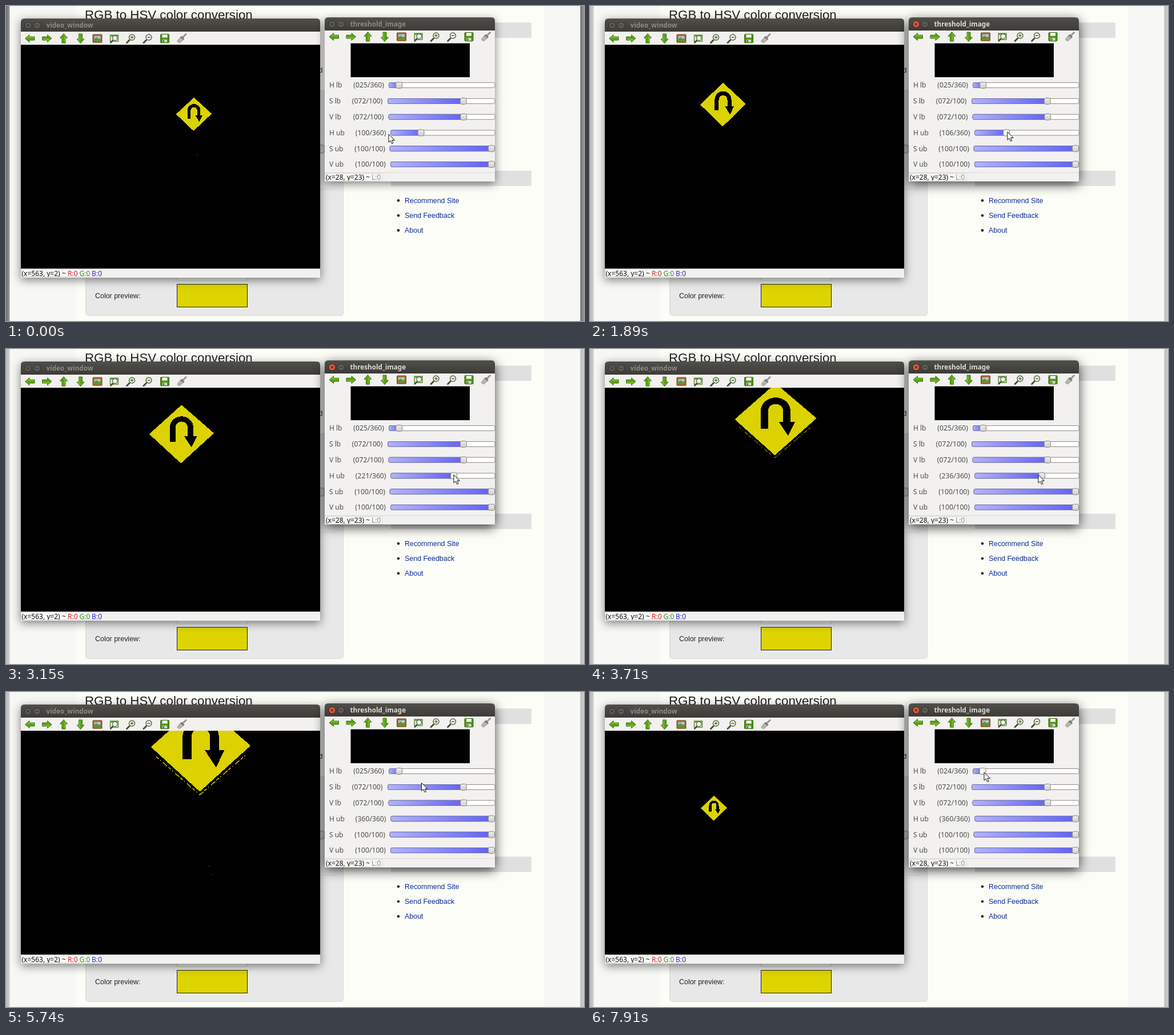
Recreate the animation shown at these times as an HTML page. Size 1012 px wide and 553 px high, loop 8000 ms.

```html
<!DOCTYPE html>
<html lang="en">
<head>
<meta charset="utf-8">
<title>HSV threshold tuning</title>
<style>
html, body { margin: 0; width: 100%; height: 100%; overflow: hidden; background: #fdfdf8; }
svg { display: block; width: 1012px; height: 553px; }
.page { font-family: "Liberation Sans", Arial, sans-serif; font-size: 12.45px; fill: #222; }
.ui { font-family: "Noto Sans", "Open Sans", sans-serif; font-size: 12px; fill: #4c4c4c; }
.title { font-weight: 700; font-size: 11.7px; fill: #8b8a83; }
.link { fill: #0b2d92; }
.shadow { filter: drop-shadow(0 4px 8px rgba(0, 0, 0, .5)); }
.focused .shadow { filter: drop-shadow(0 5px 10px rgba(0, 0, 0, .75)); }
.focused .title { fill: #dfdbd2; }
.close { fill: #5d5c57; }
.focused .close { fill: #ea5a35; }
</style>
</head>
<body>
<svg id="stage" viewBox="0 0 1012 553">
  <defs>
    <linearGradient id="bar" x2="0" y2="1"><stop stop-color="#504f4a"/><stop offset="1" stop-color="#3c3b37"/></linearGradient>
    <linearGradient id="fill"><stop stop-color="#b2b2fa"/><stop offset="1" stop-color="#6262f6"/></linearGradient>
    <linearGradient id="knob" x2="0" y2="1"><stop stop-color="#ededeb"/><stop offset="1" stop-color="#cfcecb"/></linearGradient>
    <linearGradient id="edge"><stop stop-color="#6c6c6c"/><stop offset="1" stop-color="#9b9b9b"/></linearGradient>
    <linearGradient id="paleEdge"><stop stop-color="#bababa"/><stop offset="1" stop-color="#cfcfcf"/></linearGradient>
    <clipPath id="view"><path d="M26 68h524v393H26z"/></clipPath>
    <clipPath id="panel"><path d="M558 20h298.500v288H558z"/></clipPath>
    <clipPath id="statusA"><path d="M26 461h524v14.500H26z"/></clipPath>
    <clipPath id="statusB"><path d="M558 293h298v13.500H558z"/></clipPath>

    <g id="arrow"><path d="M-8.500 0L-1-6.500V-3H8V3H-1V6.500z" fill="#5ba414" stroke="#3c770b" stroke-linejoin="round"/><path d="M-6-.5L-2-4v2.200h9" fill="none" stroke="#93cf4b"/></g>
    <g id="picture"><rect x="-8" y="-7" width="16" height="14" rx="1" fill="#b5651d" stroke="#77400f"/><path d="M-5.500-4.500h11v9h-11z" fill="#8fc3e8"/><path d="M-5.500 4.500V1l4-3 3 3 2-1.500 2 2v3z" fill="#4f9a2a"/><circle cx="3" cy="-2.500" r="1.300" fill="#f7e06a"/></g>
    <g id="lens"><path d="M-3 3l-4.500 4.500" stroke="#49433b" stroke-width="2.800" stroke-linecap="round"/><circle cx="1.500" cy="-2" r="5" fill="#eef5e8" stroke="#5d6355" stroke-width="1.500"/></g>
    <g id="fit"><path d="M-7-6h14V5H-7z" fill="#dcebd0" stroke="#63963a" stroke-width="1.500"/><path d="M-6-4.500H6" stroke="#4e8d20" stroke-width="2"/><g transform="translate(0 1) scale(.85)"><use href="#lens"/></g></g>
    <g id="zoomIn"><use href="#lens"/><path d="M-1-2h5M1.500-4.500v5" stroke="#4d9610" stroke-width="1.800"/></g>
    <g id="zoomOut"><use href="#lens"/><path d="M-1-2h5" stroke="#4d9610" stroke-width="1.800"/></g>
    <g id="save"><rect x="-7.500" y="-7.500" width="15" height="15" rx="1.500" fill="#4c9512" stroke="#34690a"/><path d="M-4.500-7h9v5.500h-9z" fill="#f0f5ea"/><path d="M-4 2h8v5h-8z" fill="#cfd8c6"/><path d="M-2 3v3.500" stroke="#34690a" stroke-width="2"/></g>
    <g id="brush"><path d="M2.500-2.500L7.500-7.500" stroke="#97968f" stroke-width="3" stroke-linecap="round"/><path d="M0-4.500l5 5-2 2-5.500-5z" fill="#77766f"/><path d="M-2.500-2.500L3 2.500-4 8l-4-3z" fill="#b4b3ac" stroke="#8f8e88" stroke-width=".7"/></g>
  </defs>

  <g class="page">
    <path d="M0 0h1012v553H0z" fill="#f7f7f5"/>
    <path d="M123 0h819v553H123z" fill="#fdfdf8"/>
    <g id="edges" fill="url(#edge)"><path d="M0 0h6.500v553H0z"/><path d="M1005.500 0h6.500v553h-6.500z"/></g>
    <text x="138" y="23" font-size="22.3">RGB to HSV color conversion</text>
    <text x="547.500" y="117">d</text>
    <rect x="139.500" y="148.500" width="451" height="395" rx="5" fill="#e8e8e8" stroke="#d8d8d8"/>
    <path d="M550 321.500h25" stroke="#c8c8c8" stroke-dasharray="1 1"/>
    <rect x="545" y="244" width="13" height="14" rx="4" fill="#d4d4d4" stroke="#8c8c8c"/>
    <path d="M299.500 470v12h123v-12" fill="#eef0ea" stroke="#c6d3c8"/>
    <text x="156" y="513">Color preview:</text>
    <rect x="299.500" y="488.500" width="123" height="40" fill="#ddd400" stroke="#222"/>
    <path d="M674 29h246v27H674zM674 289h246v27H674z" fill="#e0e0e0"/>
    <g id="links"></g>
  </g>
  <g id="videoWindow" class="ui"></g>
  <g clip-path="url(#view)" shape-rendering="crispEdges">
    <g id="sign">
      <path d="M-.98 0L0-.98 .98-.03 -.02 .98z" fill="#dcd200" stroke="#dcd200" stroke-width=".04" stroke-linejoin="round"/>
      <path d="M-.28 .27V-.2C-.28-.63 .28-.63 .28-.2V.1" fill="none" stroke="#000" stroke-width=".18"/>
      <path d="M.08 .07H.48L.31 .46z"/>
      <path id="rim" d="M-.9 .22L-.02 1.08 .9 .19" fill="none" stroke="#c9c000" stroke-width=".018" stroke-dasharray=".07 .04 .02 .06 .12 .03"/>
    </g>
    <rect id="speckA" width="1" height="1" fill="#8a8840"/>
    <rect id="speckB" width="1" height="1" fill="#8a8840"/>
  </g>
  <g id="panelWindow" class="ui"></g>
  <path id="cursor" d="M0 0V14.300l3.300-3 2.300 5.200 2.400-1-2.300-5h4.600z" fill="#fff" stroke="#111" stroke-linejoin="round"/>
</svg>
<script>
const $ = id => document.getElementById(id);
const LOOP = 8000, STEP = 70, LAST = 7910;
const FOCUS_AT = 1820, RESTART_AT = 7490;
const PAUSES = [[3290, 3430], [3710, 3850], [4900, 5110], [7140, 7280]];

// time, centre x, centre y, half width, half height
const SIGN = [
  [0, 329, 190, 31, 29], [840, 168, 190, 33.5, 31], [1120, 163, 186.5, 34.5, 33.5],
  [1680, 215, 175, 38, 37], [2590, 293, 167, 45, 42], [3290, 311, 145, 59, 53],
  [3710, 325, 123.5, 71, 62.5], [4690, 341, 95.5, 87, 78], [6720, 341, 97.5, 86, 77.5],
  [RESTART_AT - STEP, 340, 97, 86, 77.5], [RESTART_AT, 222, 206, 22, 21.5], [LAST, 217, 204, 23, 22]
];
// time, tip x, tip y
const CURSOR = [
  [0, 670, 225], [350, 711, 226], [560, 711, 215], [910, 691, 142], [1120, 689, 137],
  [1330, 692, 150], [1680, 727, 221], [1820, 728, 221], [2590, 760, 220], [3290, 790, 221],
  [3710, 785, 221], [4690, 853, 223], [4900, 860, 225], [5250, 859, 224], [5880, 690, 141],
  [6020, 689, 140], [6720, 666, 139], [7140, 668, 140], [7910, 690, 141]
];
const UPPER_HUE = [[0, 100], [1820, 100], [2590, 162], [3290, 236], [3850, 236], [4690, 353], [4900, 360], [LAST, 360]];
const LOWER_HUE = [[0, 25], [6020, 25], [6650, 0], [7140, 0], [LAST, 24]];

// label, value, maximum, track start, row y, right end of the number
const SLIDERS = [
  ["H lb", 25, 360, 670, 139, 662], ["S lb", 72, 100, 668, 167, 659.5], ["V lb", 72, 100, 669.5, 194.700, 661.5],
  ["H ub", 100, 360, 673, 222.500, 665.5], ["S ub", 100, 100, 671.5, 250.300, 664], ["V ub", 100, 100, 673, 278, 665]
];

function at(keys, t) {
  let i = 1;
  while (i < keys.length - 1 && keys[i][0] < t) i++;
  const a = keys[i - 1], b = keys[i];
  const p = Math.min(1, (t - a[0]) / (b[0] - a[0]));
  return a.slice(1).map((v, k) => v + (b[k + 1] - v) * p);
}

function set(el, attrs) {
  for (const k in attrs) el.setAttribute(k, attrs[k]);
}

function windowFrame(x, y, w, h, title) {
  const button = (cx, cls, mark) =>
    `<circle cx="${cx}" cy="${y + 12}" r="5.800" class="${cls}" fill="#5d5c57" stroke="#33322e"/>
     <path d="${mark}" transform="translate(${cx} ${y + 12})" stroke="#33322e" stroke-width="1.300"/>`;
  return `<path class="shadow" d="M${x} ${y + h}V${y + 6}q0-6 6-6h${w - 12}q6 0 6 6v${h - 6}z" fill="#f2f1f0"/>
    <path d="M${x} ${y + 23}v-17q0-6 6-6h${w - 12}q6 0 6 6v17z" fill="url(#bar)"/>
    ${button(x + 13, "close", "M-2-2l4 4m0-4l-4 4")}${button(x + 28.5, "", "M-2.500 0h5")}
    <text class="title" x="${x + 44.5}" y="${y + 16}">${title}</text>`;
}

function toolbar(x, y) {
  const turns = [0, 180, 90, -90];
  const names = ["arrow", "arrow", "arrow", "arrow", "picture", "fit", "zoomIn", "zoomOut", "save", "brush"];
  return names.map((name, i) =>
    `<use href="#${name}" transform="translate(${x + i * 29.5} ${y}) rotate(${turns[i] || 0})"/>`).join("");
}

function status(x, y, w, clip, parts) {
  const texts = parts.map(([dx, color, text]) => `<text x="${x + dx}" y="${y + 11.5}" fill="${color}">${text}</text>`);
  return `<path d="M${x - 1} ${y + 13.5}V${y + .5}h${w}v13z" fill="#f8f7f6" stroke="#d6d4d0"/>
    <g clip-path="url(#${clip})">${texts.join("")}</g>`;
}

function slider([label, , , x, y, end], i) {
  const box = `y="${y - 4.5}" height="9" rx="2.500"`;
  return `<text x="566" y="${y + 4.3}">${label}</text>
    <text id="num${i}" x="${end}" y="${y + 4.3}" text-anchor="end" font-size="12.2"></text>
    <rect x="${x + .5}" width="${855.5 - x}" ${box} fill="#fff" stroke="#8d8c88"/>
    <rect id="fill${i}" x="${x + .5}" ${box} fill="url(#fill)" stroke="#7070b0"/>
    <rect id="knob${i}" y="${y - 5.5}" width="11" height="11" rx="3" stroke="#85847f"/>`;
}

function build() {
  $("links").innerHTML = ["Recommend Site", "Send Feedback", "About"].map((text, i) =>
    `<circle cx="687" cy="${341.5 + i * 26.2}" r="2.300"/>
     <text class="link" x="698" y="${345.5 + i * 26.2}">${text}</text>`).join("");
  $("videoWindow").innerHTML = windowFrame(26, 22, 524, 455, "video_window") + toolbar(42, 57) +
    `<path d="M26 68h524v393H26z" fill="#000"/>` +
    status(27.5, 462, 141, "statusA", [[0, "#111", "(x=563, y=2) ~"], [80.5, "#d81e1e", "R:0"],
      [101, "#2c8a1c", "G:0"], [122.5, "#2626c8", "B:0"]]);
  $("panelWindow").innerHTML = windowFrame(558, 20, 298, 288, "threshold_image") + toolbar(574.5, 54) +
    `<path d="M603.500 65.500h208.500v59.500H603.500z" fill="#000"/>
     <path d="M558 292.500h298" stroke="#dcdad6"/>` +
    `<g clip-path="url(#panel)">${SLIDERS.map(slider).join("")}</g>` +
    status(560, 293.5, 100, "statusB", [[0, "#111", "(x=28, y=23) ~"], [80, "#8a8a8a", "L:0"]]);
}

function moveSlider(i, value, pointer) {
  const [, , max, x, y] = SLIDERS[i];
  const center = x + 6 + (850 - x - 6) * value / max;
  const hover = Math.abs(pointer[0] - center) < 6 && Math.abs(pointer[1] - y) < 6;
  $("num" + i).textContent = `(${String(Math.round(value)).padStart(3, "0")}/${max})`;
  set($("fill" + i), { width: center - x });
  set($("knob" + i), { x: center - 5.5, fill: hover ? "#f8f8f7" : "url(#knob)" });
}

function draw(now) {
  let t = Math.min(LAST, Math.floor(now % LOOP / STEP) * STEP);
  for (const [from, to] of PAUSES) if (t > from && t < to) t = from;

  const [cx, cy, hw, hh] = at(SIGN, t);
  set($("sign"), { transform: `translate(${cx} ${cy}) scale(${hw} ${hh})` });
  set($("rim"), { opacity: hw > 80 ? 1 : hw > 65 ? .6 : 0 });
  const early = t < 1750, late = t >= 4690 && t < RESTART_AT;
  const speckY = cy + hh * (early ? 2.45 : 2.68);
  set($("speckA"), { x: cx + hw * .16, y: speckY, opacity: early || late ? 1 : 0 });
  set($("speckB"), { x: cx + hw * .22 + 2, y: speckY + hh * .19, opacity: early && t > 400 || late ? 1 : 0 });

  const pointer = at(CURSOR, t);
  set($("cursor"), { transform: `translate(${pointer})` });
  const live = { 0: at(LOWER_HUE, t)[0], 3: at(UPPER_HUE, t)[0] };
  SLIDERS.forEach((s, i) => moveSlider(i, live[i] ?? s[1], pointer));

  const focused = t >= FOCUS_AT;
  $("panelWindow").classList.toggle("focused", focused);
  set($("edges"), { fill: focused ? "url(#paleEdge)" : "url(#edge)" });
}

build();
const start = performance.now();
function tick() {
  draw(performance.now() - start);
  requestAnimationFrame(tick);
}
tick();
</script>
</body>
</html>
```
